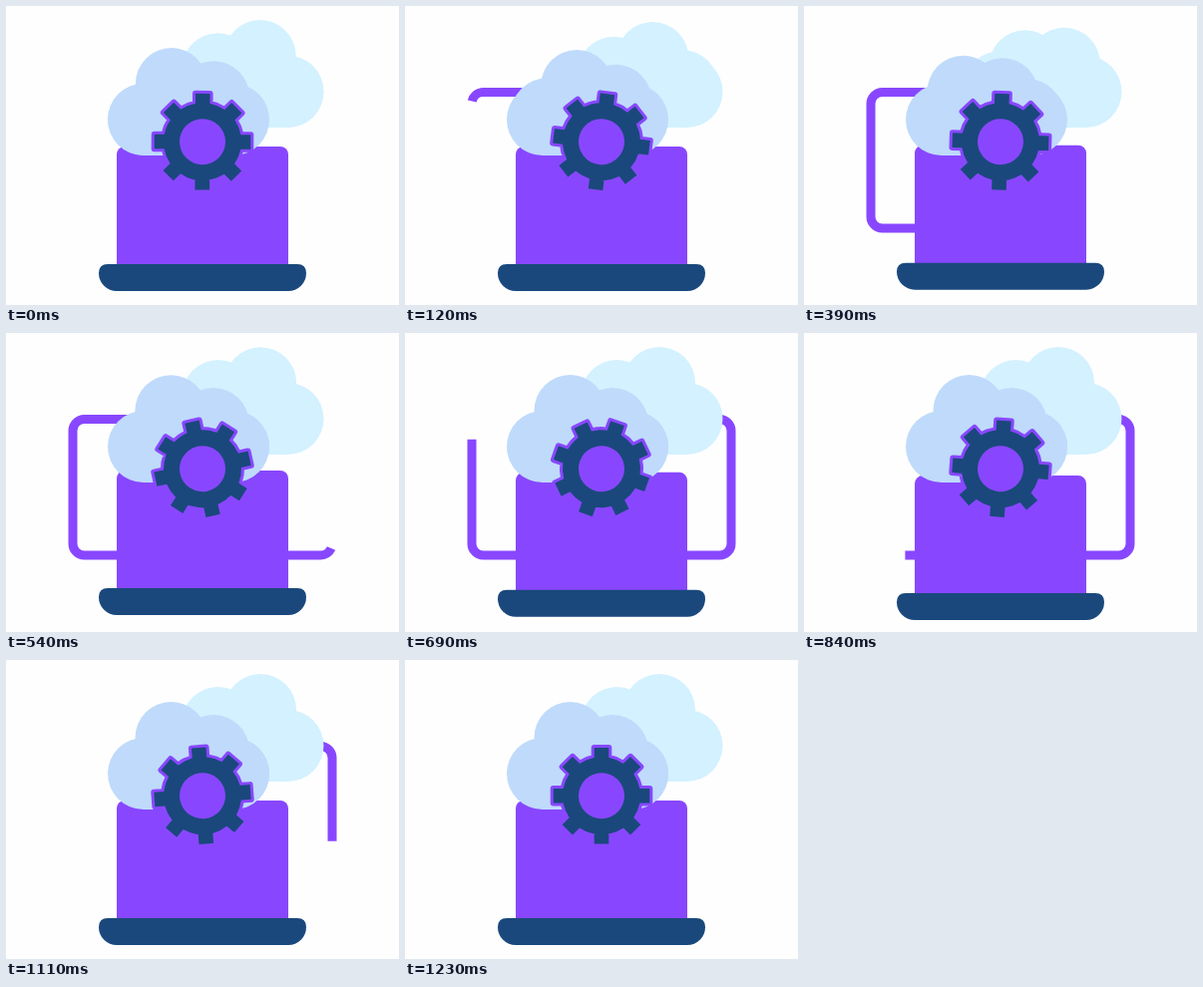
These frames come from a looping animation (394 px wide and 300 px high, 1320 ms). An HTML page with a canvas:

```html
<!DOCTYPE html>
<html lang="en">
<head>
<meta charset="utf-8">
<title>Cloud sync</title>
<style>
  html, body { margin: 0; width: 100%; height: 100%; overflow: hidden; background: #fefefe; }
  canvas { display: block; }
</style>
</head>
<body>
<canvas id="stage" width="394" height="300"></canvas>
<script>
const ctx = document.getElementById('stage').getContext('2d');
const PURPLE = '#8847ff', NAVY = '#1a487c', BLUE = '#bfdafb', PALE = '#d3f1ff';
const LOOP = 1320, LAST = 1230, LEAD = 30;

const ease = (t, from, to) => {
  const s = Math.min(1, Math.max(0, (t - from) / (to - from)));
  return s * s * (3 - 2 * s);
};

const cable = new Path2D();
cable.moveTo(172, 86.5);
[[67, 86.5, 67, 150], [67, 223, 197, 223], [327, 223, 327, 150], [327, 86.5, 250, 86.5]]
  .forEach(corner => cable.arcTo(...corner, 11.5));
cable.lineTo(250, 86.5);

const screen = new Path2D();
screen.roundRect(111, 141, 172, 119, [8, 8, 0, 0]);
const base = new Path2D('M102 259H292q9 0 9 9a18 18 0 0 1-18 18H111a18 18 0 0 1-18-18q0-9 9-9z');

const gear = new Path2D();
gear.arc(0, 0, 39, 0, 2 * Math.PI);
const tooth = new Path2D('M-7.3-36V-48.3H7.3V-36z');
for (let i = 0; i < 8; i++) gear.addPath(tooth, new DOMMatrix().rotate(i * 45));

function drawCable(t) {
  const head = Math.max(0, 0.915 * (t - 2));
  const tail = Math.max(0, 0.97 * (t - 567));
  if (head <= tail) return;
  ctx.strokeStyle = PURPLE;
  ctx.lineWidth = 9;
  ctx.setLineDash([0, tail, head - tail, 2000]);
  ctx.stroke(cable);
  ctx.setLineDash([]);
}

// Each puff rolls to the place of the next one.
function drawCloud(x, y, dir, color, p) {
  const places = [[0, 0], [27.5, -36], [70, -23], [90, 0]];
  ctx.save();
  ctx.translate(x, y);
  ctx.scale(dir, 1);
  ctx.fillStyle = color;
  const puff = (px, py) => {
    ctx.beginPath();
    ctx.arc(px, py, 36, 0, 2 * Math.PI);
    ctx.fill();
  };
  ctx.fillRect(0, -14, 90, 50);
  puff(0, 0);
  puff(90, 0);
  for (let i = 0; i < 3; i++) {
    const [ax, ay] = places[i], [bx, by] = places[i + 1];
    puff(ax + (bx - ax) * p, ay + (by - ay) * p);
  }
  ctx.restore();
}

function drawLaptop(t) {
  const bob = -3 * ease(t, 240, 560) + 5.5 * ease(t, 560, 900) - 2.5 * ease(t, 900, 1080);
  ctx.save();
  ctx.translate(0, bob);
  ctx.fillStyle = PURPLE;
  ctx.fill(screen);
  ctx.fillStyle = NAVY;
  ctx.fill(base);
  ctx.restore();
}

function drawGear(t) {
  ctx.save();
  ctx.translate(197, 136.2);
  ctx.rotate(Math.PI * ease(t, -LEAD, LAST));
  ctx.strokeStyle = PURPLE;
  ctx.lineWidth = 6;
  ctx.lineJoin = 'round';
  ctx.stroke(gear);
  ctx.fillStyle = NAVY;
  ctx.fill(gear);
  ctx.fillStyle = PURPLE;
  ctx.beginPath();
  ctx.arc(0, 0, 23, 0, 2 * Math.PI);
  ctx.fill();
  ctx.restore();
}

function draw() {
  const t = Math.min(performance.now() % LOOP, LAST);
  const roll = ease(t, -LEAD, 570);
  ctx.fillStyle = '#fefefe';
  ctx.fillRect(0, 0, 394, 300);
  drawCable(t);
  drawCloud(282.5, 86, -1, PALE, roll);
  drawLaptop(t);
  drawCloud(138, 114, 1, BLUE, roll);
  drawGear(t);
  requestAnimationFrame(draw);
}
draw();
</script>
</body>
</html>
```
